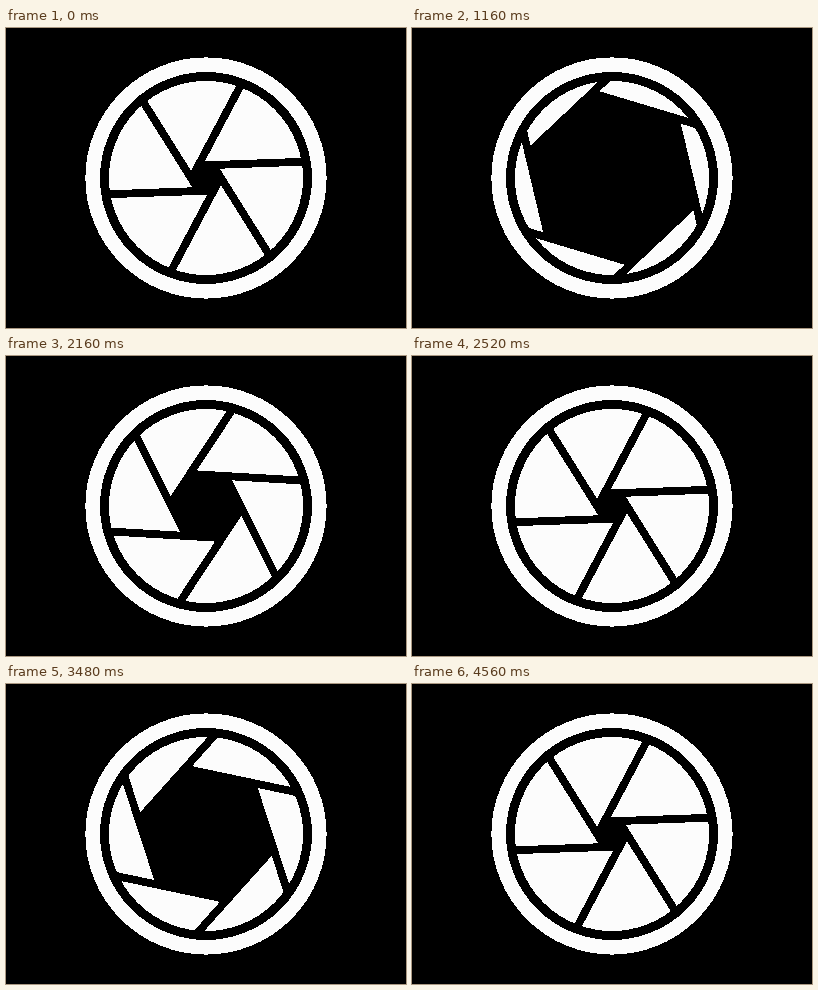
Write an HTML page that moves like this. It is 400 px wide and 300 px high and loops after 4.96 s.

```html
<!DOCTYPE html>
<html lang="en">
<head>
<meta charset="utf-8">
<title>Aperture</title>
<style>
  html, body { margin: 0; width: 100%; height: 100%; overflow: hidden; background: #000; }
  svg { display: block; shape-rendering: crispEdges; }
</style>
</head>
<body>
<svg width="400" height="300" viewBox="-200 -150 400 300">
  <defs><polygon id="blade" fill="#fcfcfc"/></defs>
  <g id="iris">
    <use href="#blade"/>
    <use href="#blade" transform="rotate(60)"/>
    <use href="#blade" transform="rotate(120)"/>
    <use href="#blade" transform="rotate(180)"/>
    <use href="#blade" transform="rotate(240)"/>
    <use href="#blade" transform="rotate(300)"/>
  </g>
  <!-- black surround hides the blades outside the rim -->
  <circle r="247" fill="none" stroke="#000" stroke-width="300"/>
  <circle r="113.3" fill="none" stroke="#fcfcfc" stroke-width="14.6"/>
</svg>
<script>
const blade = document.getElementById('blade');
const iris = document.getElementById('iris');
const LOOP = 4960, STEP = 40, END = 4560;
const GAP = 7.8, SIDE = 220, SIN60 = Math.sin(Math.PI / 3);
const CLOSED = 16.6;

// [ms, distance of the blade edges from the centre]
const keys = [
  [0, CLOSED], [560, 37], [1160, 79.5], [1380, 86.5], [1760, 64], [2240, 30],
  [2520, CLOSED], [2800, 26], [3360, 55], [3480, 63.5], [3760, 79], [3920, 71],
  [4480, 20], [END, CLOSED]
];

const slope = i => (keys[i + 1][1] - keys[i][1]) / (keys[i + 1][0] - keys[i][0]);

// Zero at turning points, otherwise the harmonic mean of both sides
function tangent(i) {
  if (i === 0 || i === keys.length - 1) return 0;
  const a = slope(i - 1), b = slope(i);
  return a * b <= 0 ? 0 : 2 * a * b / (a + b);
}

function opening(t) {
  let i = 0;
  while (i < keys.length - 2 && t >= keys[i + 1][0]) i++;
  const [t0, v0] = keys[i], [t1, v1] = keys[i + 1];
  const h = t1 - t0, u = (t - t0) / h, w = 1 - u;
  return w * w * (1 + 2 * u) * v0 + u * u * (3 - 2 * u) * v1
    + h * u * w * (w * tangent(i) - u * tangent(i + 1));
}

// Each blade is a 60 degree wedge; its first side is an edge of the opening
function draw(t) {
  const a = opening(t);
  const y = (GAP - a / 2) / SIN60;
  const points = [[a, y], [a, y + SIDE], [a + SIDE * SIN60, y + SIDE / 2]];
  blade.setAttribute('points', points.join(' '));
  iris.setAttribute('transform', `rotate(${27.9 + (a - CLOSED) / 3.35})`);
}

const start = performance.now();
function tick() {
  const t = (performance.now() - start) % LOOP;
  draw(Math.min(END, Math.floor(t / STEP) * STEP));
  requestAnimationFrame(tick);
}
tick();
</script>
</body>
</html>
```
